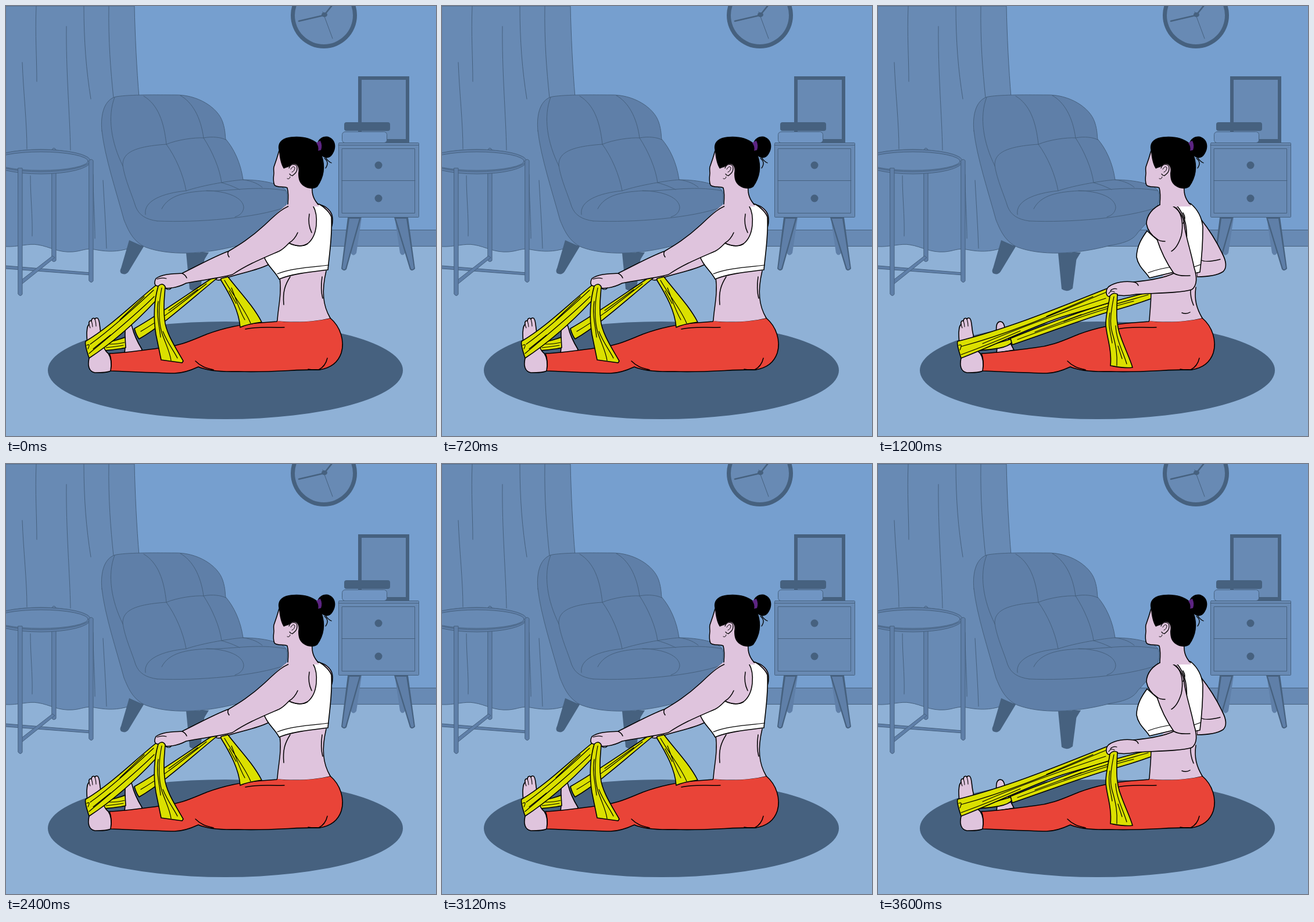
An HTML page with a canvas that plays this animation: 740 by 740 pixels, repeating every 4800 ms.

```html
<!DOCTYPE html>
<html lang="en">
<head>
<meta charset="utf-8">
<title>Seated band row</title>
<style>
  html, body { margin: 0; width: 100%; height: 100%; overflow: hidden; background: #8fb1d6; }
  canvas { display: block; width: 740px; height: 740px; }
</style>
</head>
<body>
<canvas id="stage" width="740" height="740"></canvas>
<script>
const ctx = document.getElementById('stage').getContext('2d');
const HOLD = 1200;
const WALL = '#769fcf', FLOOR = '#8fb1d6', MID = '#688ab4', SEAT = '#5f7fa8', DARK = '#46617f';
const SKIN = '#dfc4dd', RED = '#e94438', BAND = '#dbe000', WHITE = '#fff', INK = '#000';

function shape(d, fill, stroke = INK, width = 1.6) {
  const p = new Path2D(d);
  if (fill) { ctx.fillStyle = fill; ctx.fill(p); }
  if (stroke) { ctx.strokeStyle = stroke; ctx.lineWidth = width; ctx.stroke(p); }
}
const line = (d, width = 1.5) => shape(d, null, INK, width);
const flat = (d, fill) => shape(d, fill, null);
const decor = (d, fill) => shape(d, fill, DARK, 1);

function ellipse(x, y, rx, ry, fill, stroke) {
  ctx.beginPath();
  ctx.ellipse(x, y, rx, ry, 0, 0, 7);
  if (fill) { ctx.fillStyle = fill; ctx.fill(); }
  if (stroke) { ctx.strokeStyle = stroke; ctx.lineWidth = 1; ctx.stroke(); }
}

function box(x, y, w, h, r, fill, stroke) {
  ctx.beginPath();
  ctx.roundRect(x, y, w, h, r);
  if (fill) { ctx.fillStyle = fill; ctx.fill(); }
  if (stroke) { ctx.strokeStyle = stroke; ctx.lineWidth = 1; ctx.stroke(); }
}

function drawWall() {
  box(0, 0, 740, 740, 0, FLOOR);
  box(0, 0, 740, 386, 0, WALL);
  box(200, 385.5, 560, 28, 0, MID, DARK);
  decor('M0 0H221C222 50 225 110 229 157L241 412C225 413 215 416 205 419C185 424 168 422 152 419C138 416 130 422 115 423C90 425 75 414 55 411C40 408 20 415 0 414Z', MID);
  decor('M52 0C50 50 53 90 53 130M134 0C134 60 138 110 146 160M177 0C176 60 180 110 185 158M104 35C103 110 110 190 111 248M28 97C30 150 36 200 36 246M42 292C42 330 46 360 45 396M150 290C150 330 153 370 153 400M167 300C169 340 172 380 173 417M80 300V424');
}

function drawClock() {
  ellipse(547, 16, 57, 57, DARK);
  ellipse(547, 16, 50, 50, MID);
  shape('M547 16L504 26', null, DARK, 2.6);
  shape('M549 14L561 -1', null, DARK, 2.6);
  shape('M545 10L562 56', null, DARK, 1);
  ellipse(548, 15, 5, 4, DARK);
}

function drawTable() {
  decor('M79 247Q82 242 86 247V438Q82 442 79 438Z', SEAT);
  decor('M0 447L146 459V463L0 452Z', SEAT);
  decor('M26 472L80 430L84 433L28 478Z', SEAT);
  ellipse(60, 268, 85, 21, SEAT, DARK);
  ellipse(60, 266, 85, 19, SEAT, DARK);
  ellipse(60, 267, 81, 16, MID, DARK);
  decor('M21 279H28V496Q25 501 21 496Z', SEAT);
  decor('M143 266Q147 262 150 266V473Q147 478 143 473Z', SEAT);
}

function drawChair() {
  flat('M212 403L237 414L211 457Q206 464 198 460Q195 456 198 451Z', DARK);
  flat('M334 424H349L341 437Q338 442 333 439Z', DARK);
  flat('M310 425L343 424L335 486Q325 494 316 487Z', DARK);
  decor('M165 215C162 185 170 160 190 156C215 152 260 153 290 153C330 152 365 175 373 200C378 215 377 225 378 229C392 245 404 270 408 299C440 299 478 306 483 320C488 345 470 365 447 390C440 402 425 408 400 412C340 428 280 430 240 415C218 405 210 385 203 368C190 320 170 260 165 215Z', SEAT);
  decor('M187 157C174 190 181 235 201 275M237 155C262 170 272 200 276 238M300 154C320 165 335 190 340 227M201 275C200 255 215 242 276 238C295 230 325 226 340 227C355 224 370 226 378 230M201 275C205 300 217 325 223 345C229 360 240 367 260 370M276 238C292 260 305 290 310 318M340 227C355 250 368 280 371 304');
  decor('M240 359C236 335 270 322 310 318C340 308 390 300 408 299M260 370C330 373 430 365 482 346M268 349C280 325 310 320 345 318C380 318 410 330 409 348C407 358 400 361 394 363M345 318C380 320 430 308 482 318M371 304C385 308 392 311 402 316M408 299C425 301 435 307 441 312');
}

function drawCabinet() {
  flat('M595 364H612L603 425Q598 432 594 426Z', SEAT);
  flat('M669 364H684L687 425Q682 432 678 425Z', SEAT);
  flat('M588 364H611L586 453Q581 458 577 452Z', DARK);
  flat('M668 364H692L704 452Q699 458 695 453Z', DARK);
  flat('M591 366H608L584 452Q581 455 579 451ZM671 366H689L702 451Q699 455 697 452Z', SEAT);
  box(606, 121, 88, 114, 0, DARK);
  box(612, 127, 76, 102, 0, MID);
  box(582, 200, 79, 15, 4, DARK);
  box(578.5, 216.5, 77, 19, 5, '#7095c3', DARK);
  box(572.5, 235.5, 138, 128, 1, MID, DARK);
  decor('M572 239.5H710');
  box(578.5, 245.5, 125, 111, 0, null, DARK);
  decor('M578 300.5H704');
  ellipse(641, 274, 6.5, 6.5, DARK);
  ellipse(641, 331, 6.5, 6.5, DARK);
}

function drawPants() {
  shape('M467 541C480 544 520 545 558 537C576 552 583 577 577 597C571 615 558 623 540 626C500 625 460 631 400 629C365 630 345 627 331 621C318 627 305 632 290 632C250 631 210 629 180 628C182 615 181 605 178 598C210 597 245 591 270 588C300 585 320 575 345 565C380 552 410 547 440 545L466 543Z', RED);
  line('M412 556C435 551 455 554 479 553M326 611C335 620 343 623 357 626M553 606C551 615 546 622 538 626M540 626Q530 627 520 625');
}

function drawFrontFoot() {
  shape('M143 606C140 620 143 629 153 631C165 631 174 631 180 628C182 615 181 605 176 598C168 592 165 580 164 566C161 556 162 545 159 539C158 536 154 536 153 539C152 536 147 537 147 542C144 541 142 543 143 548C139 551 140 555 139 562C139 585 143 598 143 606Z', SKIN);
  line('M153 539Q155 545 155 551M147 542Q149 548 149 552M143 548Q144 552 145 554', 1.1);
}

function drawHead() {
  flat('M470 249C467 260 465 266 461 277C459 290 460 300 462 308C466 313 478 310 484 313C486 320 486 330 486 345L539 345C530 336 526 325 526 305L510 260Z', SKIN);
  line('M470 249C467 260 465 266 461 277C460 281 461 284 461 288C460 296 460 304 462 308C466 313 478 310 484 313C486 320 486 330 485 341M527 312C526 324 530 334 538 342');
  flat('M470 250C467 240 470 231 482 227C500 222 524 225 536 236C538 227 549 222 557 226C568 231 569 245 562 255C557 263 549 263 544 258C550 275 548 295 536 311C529 316 519 315 511 309C505 304 503 298 503 288C506 275 498 269 491 273C487 278 484 277 478 280C473 272 471 262 470 250Z', INK);
  flat('M534 236Q539 232 541 232Q545 240 542 248L537 249Q539 242 534 236Z', '#5c2482');
  line('M549 259Q553 267 560 270M548 262Q557 269 550 279', 1.3);
  shape('M487 279C490 270 501 271 501 279C501 287 496 289 493 292Q490 292 488 289', SKIN, INK, 1.3);
  line('M490 281Q494 274 497 278Q497 284 492 286M484 297Q488 299 489 294', 1);
}

function drawReach() {
  shape('M204 597C207 580 203 562 206 553C208 545 215 545 217 552C220 565 226 578 234 591L232 595Z', SKIN);
  shape('M446 431C425 438 405 442 390 450C375 457 366 462 357 466C360 472 366 473 373 470C400 460 430 456 452 445Z', SKIN);
  shape('M355 468C320 491 262 532 221 555C223 563 226 569 229 573C272 548 318 505 365 467Z', BAND);
  line('M345 478C310 505 270 538 232 560M330 488L280 524', 1.2);
  shape('M168 581C185 576 195 574 205 570L206 588C195 591 178 592 160 594Z', BAND);
  line('M178 582Q192 582 204 579M172 588Q190 586 202 584', 1.1);
  drawPants();
  shape('M370 469L382 466C400 490 425 515 440 544C425 546 412 549 403 553C401 525 386 498 370 472Z', BAND);
  line('M376 472C392 500 410 520 421 546M388 485C398 510 402 525 411 540M384 490L396 512', 1.2);
  drawFrontFoot();
  shape('M260 479C220 511 182 550 137 577Q135 582 143 606C187 577 227 540 257 508L274 485Z', BAND);
  line('M254 489C220 520 180 557 145 582M255 500C225 530 185 563 143 598M139 584Q146 580 141 590M238 500L196 540M180 566L150 590', 1.2);

  flat('M470 462C474 495 468 520 467 542C495 545 530 544 558 537C545 515 543 490 551 454Z', SKIN);
  line('M471 467C475 495 468 520 467 541M551 456C543 490 545 515 558 537M489 466C480 480 476 492 478 514M544 466C542 480 542 492 545 503');
  shape('M537 341C552 344 562 354 562 367C562 377 560 383 557 385L540 360Z', SKIN);
  shape('M528 342L539 341C548 346 557 355 560 363C562 395 556 430 554 454C530 457 495 460 470 470C462 455 449 447 444 431C460 425 475 418 487 408C500 414 511 414 519 409Z', WHITE);
  line('M467 461C490 451 530 449 555 446', 1.2);
  flat('M486 340C478 345 465 358 445 377C420 400 400 412 383 422C360 430 330 447 303 460C290 461 270 460 258 469C254 477 256 482 262 482C275 489 295 485 310 477C340 471 370 468 390 462C415 445 440 435 470 422C478 418 483 412 487 408C500 414 511 414 519 409C537 395 538 360 528 343C515 338 500 338 486 340Z', SKIN);
  line('M499 340C478 345 465 358 445 377C420 400 400 412 383 422C360 430 330 447 303 460C290 461 270 460 258 469C254 477 256 482 262 482C275 489 295 485 310 477C340 471 370 468 390 462C415 445 440 435 470 422C478 418 483 412 487 408C500 414 511 414 519 409C537 395 538 360 528 343C518 340 508 340 499 340M487 408C495 403 499 397 502 390M522 358C520 370 521 380 526 390M303 460Q309 463 311 468M383 422Q380 427 384 432');
  shape('M262 482C254 510 254 540 258 565L267 609L303 614L305 611C290 585 275 562 273 540C270 515 273 500 274 483Q269 475 262 482Z', BAND);
  line('M268 485C262 515 262 540 268 562C276 585 282 595 284 610M262 508C258 530 264 550 266 570M270 560C278 580 288 592 295 606', 1.2);
  line('M274 485Q280 491 285 485M260 470Q268 467 276 469', 1.2);
}

function drawPull() {
  shape('M204 597C207 580 202 562 204 550C206 541 214 541 217 549C220 562 226 578 234 592Z', SKIN);
  shape('M165 592C195 583 220 576 229 573L230 579C224 588 200 591 170 593Z', BAND);
  drawPants();
  shape('M472 491C440 499 410 507 380 516C325 534 270 555 228 572L231 583C290 563 350 540 395 527C425 519 450 511 472 503Z', BAND);
  line('M465 497C420 510 370 523 320 543M440 508C380 523 310 548 240 574M350 531L270 561', 1.2);
  drawFrontFoot();
  shape('M400 484C340 507 240 551 137 577Q135 582 143 606C205 582 280 545 330 531C355 524 378 517 397 511L412 495Z', BAND);
  line('M394 492C330 518 240 560 143 586M392 503C330 523 250 551 180 581M143 600C190 583 220 570 245 559M370 500L290 534M139 584Q146 580 141 592', 1.2);

  shape('M555 366C570 385 582 404 592 425C600 440 600 451 594 457C585 463 570 466 549 466Z', SKIN);
  line('M556 437C562 441 573 440 589 436', 1.3);
  flat('M470 485C470 510 468 525 467 542C495 545 530 544 558 537C548 520 544 505 547 482L550 455H500Z', SKIN);
  line('M470 490C470 510 468 525 467 541M547 484C544 505 548 520 558 537M538 487C537 500 540 508 543 515M523 528Q531 531 537 527');
  flat('M487 340C478 346 466 357 462 372L475 400L530 440L553 380L539 342Z', SKIN);
  shape('M512 341L538 340C550 350 557 362 559 380C559 410 557 435 554 458L545 460L509 458L467 468C463 459 448 450 445 432C445 413 455 398 463 387L480 402L530 420C534 385 530 360 512 341Z', WHITE);
  line('M465 459C478 454 490 451 506 449M544 449L555 445', 1.2);
  shape('M487 341C474 347 462 359 462 375C464 386 471 395 480 401C486 420 495 440 509 460C495 467 470 472 440 475C425 473 408 475 397 483C391 489 392 498 397 500C400 500 403 498 406 496C418 500 430 499 445 496C480 494 520 494 540 488C550 481 549 465 544 450C538 420 529 395 527 376C526 362 517 350 507 344C500 340 493 340 487 341Z', SKIN);
  line('M509 460C514 463 525 465 537 464M513 347C525 360 525 380 522 395C518 408 512 418 505 422M480 401Q485 405 494 405M525 374Q531 366 525 356M440 475Q446 476 448 481');
  shape('M399 499C397 515 392 530 392 547C392 565 403 590 400 619C412 621 425 624 438 622C434 608 425 590 418 570C408 545 411 520 412 496Q405 492 399 499Z', BAND);
  line('M406 500C401 525 398 545 403 562C410 585 412 600 411 619M409 550C410 575 422 595 428 616M399 528C395 550 401 565 403 580M413 585L420 607', 1.2);
  line('M400 490Q405 485 411 487M397 495Q400 489 407 492', 1.2);
}

function draw(now) {
  drawWall();
  drawClock();
  drawTable();
  drawChair();
  drawCabinet();
  ellipse(377.5, 627, 305.5, 84, DARK);
  const pulled = Math.floor((now - start) / HOLD) % 2 === 1;
  (pulled ? drawPull : drawReach)();
  drawHead();
}

ctx.lineJoin = ctx.lineCap = 'round';
const start = performance.now();
function tick() {
  draw(performance.now());
  requestAnimationFrame(tick);
}
tick();
</script>
</body>
</html>
```
